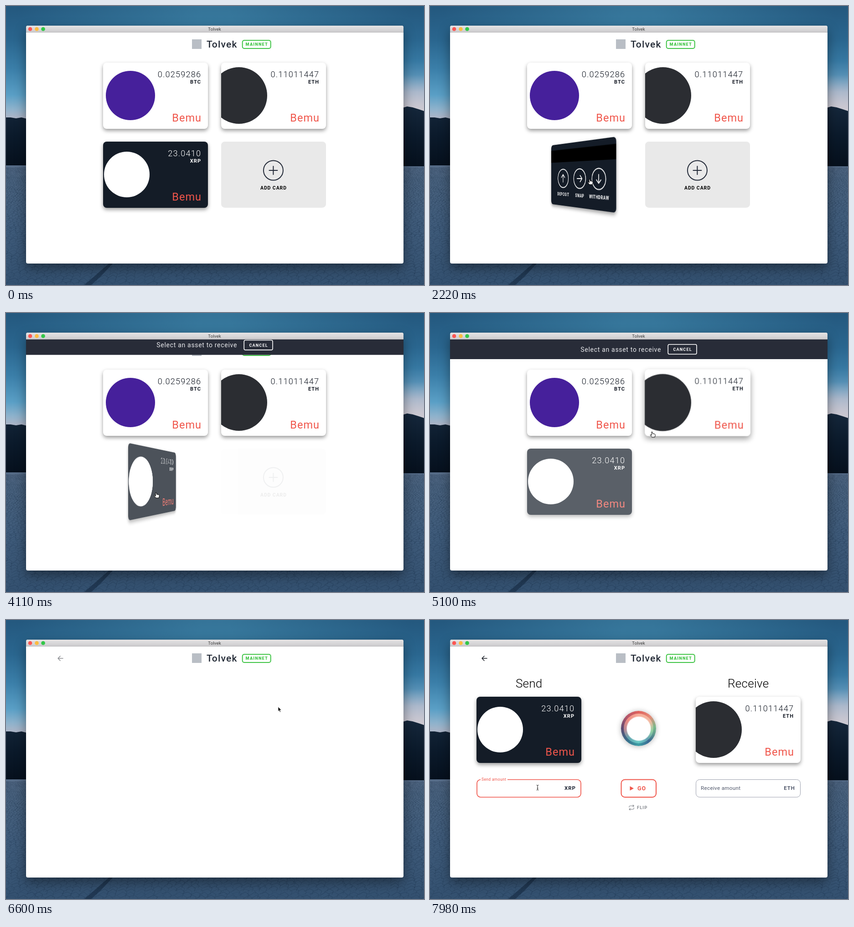
An HTML page with a canvas that plays this animation: 917 by 611 pixels, repeating every 8 s.

```html
<!DOCTYPE html>
<html lang="en">
<head>
<meta charset="utf-8">
<title>Tolvek</title>
<style>
  html, body { margin: 0; width: 100%; height: 100%; overflow: hidden; background: #2b4a68; }
  #stage { position: relative; width: 917px; height: 611px; overflow: hidden; }
  #stage > *, .page, .page > svg, .card, .flipper, .face { position: absolute; left: 0; top: 0; }
  svg { display: block; overflow: visible; font-family: Roboto, Inter, sans-serif; }
  #window { left: 43.5px; top: 42.5px; width: 828px; height: 521.5px; border-radius: 4px; background: #fff;
    box-shadow: 0 10px 26px rgba(0,0,0,.42), 0 0 1px rgba(0,0,0,.4); }
  #titlebar { left: 43.5px; top: 42.5px; width: 828px; height: 15.5px; border-radius: 4px 4px 0 0; box-sizing: border-box;
    background: linear-gradient(#e5e4e5, #cdccce); border-bottom: 1px solid #b4b3b5; }
  #clip { left: 43.5px; top: 58px; width: 828px; height: 60px; overflow: hidden; }
  #bar { position: absolute; width: 828px; height: 43px; background: #282c38; }
  .card { width: 230px; height: 145px; perspective: 700px; }
  .flipper { width: 100%; height: 100%; transform-style: preserve-3d; }
  .face { width: 100%; height: 100%; border-radius: 8px; overflow: hidden; backface-visibility: hidden;
    box-shadow: 0 4px 9px rgba(0,0,0,.4); }
  .face svg { overflow: hidden; }
  .ring { position: absolute; border-radius: 50%; }
</style>
</head>
<body>
<div id="stage"></div>
<script>
const W = 917, H = 611, LOOP = 8000;
const CORAL = '#f0564b', INK = '#141c27', GREEN = '#3fc445';
const APP = 'Tolvek', BRAND = 'Bemu';
const stage = document.getElementById('stage');

// ---- markup helpers ----
const svg = (body, w = W, h = H, id = '') => `<svg id="${id}" width="${w}" height="${h}">${body}</svg>`;
const text = (x, y, str, size, { weight = 400, fill = '#000', anchor = 'start', gap = 0 } = {}) => {
  const shift = anchor === 'end' ? gap : anchor === 'middle' ? gap / 2 : 0;
  return `<text x="${x + shift}" y="${y}" font-size="${size}" font-weight="${weight}" fill="${fill}"
    text-anchor="${anchor}" letter-spacing="${gap}">${str}</text>`;
};
const line = (d, stroke, width) =>
  `<path d="${d}" fill="none" stroke="${stroke}" stroke-width="${width}" stroke-linecap="round" stroke-linejoin="round"/>`;
const box = (x, y, w, h, r, stroke, width) =>
  `<rect x="${x}" y="${y}" width="${w}" height="${h}" rx="${r}" fill="none" stroke="${stroke}" stroke-width="${width}"/>`;
const disc = (x, y, r, fill) => `<circle cx="${x}" cy="${y}" r="${r}" fill="${fill}"/>`;

// ---- cards ----
const ASSETS = {
  BTC: { amount: '0.0259286', bg: '#fff', fg: '#111722', mark: disc(60, 72, 54, '#46209b') },
  ETH: { amount: '0.11011447', bg: '#fff', fg: '#111722', mark: disc(39, 72, 62, '#2b2d32') },
  XRP: { amount: '23.0410', bg: INK, fg: '#fff', mark: disc(52, 72, 50, '#fff') }
};

const action = (x, label, angle) => `<g id="${label}" stroke="#fff" fill="#fff">
  <circle cx="${x}" cy="81" r="21.5" fill="none" stroke-width="2"/>
  <path d="M-9 0H9M2 -7L9 0L2 7" transform="translate(${x} 81) rotate(${angle})" fill="none"
    stroke-width="2" stroke-linecap="round" stroke-linejoin="round"/>
  <text x="${x + .4}" y="122" font-size="10.5" font-weight="600" letter-spacing=".8" stroke="none"
    text-anchor="middle">${label}</text></g>`;

function card(ticker, x, y, id, withBack) {
  const a = ASSETS[ticker];
  const front = a.mark +
    text(214, 31.5, a.amount, 18.2, { weight: 350, fill: a.fg, anchor: 'end', gap: 1.15 }) +
    text(214, 46, ticker, 11, { weight: 600, fill: a.fg, anchor: 'end', gap: 1.1 }) +
    text(215, 128.5, BRAND, 23.5, { fill: CORAL, anchor: 'end', gap: 1 });
  const back = `<rect y="13.5" width="230" height="29.5"/>` +
    action(51.5, 'DEPOSIT', -90) + action(115, 'SWAP', 0) + action(179, 'WITHDRAW', 90);
  return `<div class="card" id="${id}" style="left:${x}px;top:${y}px"><div class="flipper">
    <div class="face" style="background:${a.bg}">${svg(front, 230, 145)}</div>
    ${withBack ? `<div class="face" style="background:${INK};transform:rotateY(180deg)">${svg(back, 230, 145)}</div>` : ''}
  </div></div>`;
}

// ---- pages ----
const header = `<rect x="408" y="73" width="21" height="21" fill="#b9bec5"/>` +
  text(440, 91, APP, 21, { weight: 500, fill: '#232a36', gap: 1.2 }) +
  box(518.7, 75.2, 62, 17.8, 4, GREEN, 2) +
  text(549.7, 87.4, 'MAINNET', 9.2, { weight: 800, fill: GREEN, anchor: 'middle', gap: 1.2 });

const addCard = `<rect x="472" y="297" width="230" height="144.7" rx="8" fill="#e9e9e9"/>
  <circle cx="586.4" cy="360" r="21.5" fill="none" stroke="#232a38" stroke-width="2"/>` +
  line('M577.4 360H595.4M586.4 351V369', '#232a38', 2) +
  text(586.5, 401.7, 'ADD CARD', 10.5, { weight: 600, anchor: 'middle', gap: .9 });

const titlebar = disc(53, 50.5, 4.3, '#fc5753') + disc(67.5, 50.5, 4.3, '#fdbc40') + disc(81.5, 50.5, 4.3, '#33c748') +
  text(457.5, 54, APP, 9.5, { fill: '#3a3a3a', anchor: 'middle', gap: .2 });

const barContent = text(286.3, 26.5, 'Select an asset to receive', 14, { fill: '#e8e9ec', gap: .7 }) +
  box(478.2, 10.8, 62.8, 21.4, 3, '#fff', 1.6) +
  text(509.5, 25, 'CANCEL', 9, { weight: 600, fill: '#fff', anchor: 'middle', gap: 1.2 });

const swapForm = text(217, 148, 'Send', 26, { weight: 300, anchor: 'middle', gap: .2 }) +
  text(698, 148, 'Receive', 26, { weight: 300, anchor: 'middle', gap: .3 }) +
  box(103, 349.5, 228, 38.5, 8, CORAL, 1.7) +
  `<rect x="111" y="346" width="59" height="6" fill="#fff"/>` +
  text(113, 351.8, 'Send amount', 8.5, { fill: CORAL, gap: .35 }) +
  text(319, 371.7, 'XRP', 11.5, { weight: 600, fill: '#1d2433', anchor: 'end', gap: 1 }) +
  box(419.5, 349.5, 76.5, 38.5, 8, CORAL, 2) +
  `<path d="M438.5 364L447 368.7L438.5 373.5Z" fill="${CORAL}"/>` +
  text(455, 373, 'GO', 12.5, { weight: 700, fill: CORAL, gap: 1 }) +
  line('M437 410V409Q437 407 439 407H447M445 405L447.3 407L445 409M447.3 411V412Q447.3 414.5 445 414.5H437M439.3 412.5L437 414.5L439.3 416.5', '#86898f', 1.1) +
  text(454, 414.2, 'FLIP', 9.5, { weight: 600, fill: '#86898f', gap: 1 }) +
  box(583.5, 349.5, 229, 38.5, 8, '#9ca0ae', 1) +
  text(594, 371.7, 'Receive amount', 11.7, { fill: '#50576a', gap: .3 }) +
  text(800, 371.7, 'ETH', 11.5, { weight: 600, fill: '#50576a', anchor: 'end', gap: 1 });

const ringPart = (r, style) =>
  `<div class="ring" style="left:${457.5 - r}px;top:${237.5 - r}px;width:${2 * r}px;height:${2 * r}px;${style}"></div>`;
const ring =
  ringPart(38.5, `box-shadow:0 1px 12px rgba(0,0,0,.3);background:conic-gradient(#e0625d,#e58b78 45deg,#79b98b 85deg,
    #5f9a8c 110deg,#3a6591 140deg,#3f9fa6 180deg,#37708c 220deg,#5b4a72 270deg,#b4566a 315deg,#e0625d)`) +
  ringPart(32.5, `background:conic-gradient(#f6ad9a,#f3b79f 60deg,#8fd09f 100deg,#5f9fb0 140deg,#68c9c5 180deg,
    #5fa3ad 225deg,#b98a96 265deg,#f08b80 310deg,#f6ad9a)`) +
  ringPart(26, 'background:#fff;box-shadow:0 0 3px #fff');

const cursors = `<g id="hand"><path d="M-1 0.8Q0 -.6 1 .8L1.6 4.2L4.2 4.5L6.6 5.4Q7.6 6 7.2 8.4L6.2 12H-.2L-3.6 7.6Q-3.8 6.1 -2.3 6.6L-.6 8Z"
    fill="#fff" stroke="#000" stroke-width="1" stroke-linejoin="round"/></g>
  <g id="arrow"><path d="M0 0V10.2L2.3 8.1L3.9 11.9L5.6 11.2L4 7.5H7.2Z" fill="#000" stroke="#fff" stroke-width=".8"/></g>
  <g id="beam">${line('M-2 -5.5Q0 -5.5 0 -4Q0 -5.5 2 -5.5M0 -4V4M-2 5.5Q0 5.5 0 4Q0 5.5 2 5.5M-1 1.5H1', '#222', 1)}</g>`;

stage.innerHTML = `<canvas id="scene" width="${W}" height="${H}"></canvas><div id="window"></div>
  ${svg(header)}
  <div class="page" id="home">${svg(addCard, W, H, 'add')}
    ${card('BTC', 213.3, 124, 'btc')}${card('ETH', 472, 124, 'eth')}${card('XRP', 213.3, 297, 'xrp', true)}</div>
  <div class="page" id="swap">${svg(swapForm)}${card('XRP', 102, 168.3, 'send')}${card('ETH', 583, 168.3, 'receive')}${ring}</div>
  ${svg(line('M125 84H114.5M119 79L114 84L119 89', '#1d2129', 1.5), W, H, 'back')}
  <div id="clip"><div id="bar">${svg(barContent, 828, 43)}</div></div>
  <div id="titlebar"></div>${svg(titlebar)}${svg(cursors, W, H, 'pointer')}`;

// ---- desert backdrop ----
function paintScene() {
  const c = document.getElementById('scene').getContext('2d');
  let seed = 7;
  const rnd = () => (seed = seed * 16807 % 2147483647) / 2147483647;
  const shade = (gradient, stops) => {
    stops.forEach(([at, color]) => gradient.addColorStop(at, color));
    c.fillStyle = gradient;
  };
  const polygon = points => {
    c.beginPath();
    points.forEach(p => c.lineTo(...p));
    c.fill();
  };

  shade(c.createLinearGradient(0, 0, 0, 250),
    [[0, '#24587e'], [.3, '#2a668f'], [.55, '#3b7fa9'], [.78, '#5a9fc6'], [.9, '#8db2cc'], [1, '#b5b6c6']]);
  c.fillRect(0, 0, W, 350);
  shade(c.createRadialGradient(W / 2, 40, 40, W / 2, 40, 430), [[0, 'rgba(74,150,184,.45)'], [1, 'rgba(74,150,184,0)']]);
  c.fillRect(0, 0, W, 350);
  shade(c.createLinearGradient(0, 120, 0, 225),
    [[0, 'rgba(196,192,206,0)'], [.3, 'rgba(196,192,206,.15)'], [.65, 'rgba(200,194,206,.75)'], [1, '#cbc8d1']]);
  c.fillRect(871, 120, 46, 120);

  shade(c.createLinearGradient(0, 220, 0, 350), [[0, '#15273b'], [.5, '#0b1a2b'], [1, '#06101d']]);
  polygon([[0, 244], [10, 244], [22, 246], [34, 244], [50, 248], [860, 226], [880, 220], [892, 222], [905, 226],
    [917, 230], [917, 351], [0, 349]]);

  shade(c.createLinearGradient(0, 349, 0, H), [[0, '#566c88'], [.12, '#4a637f'], [.5, '#3f5b7a'], [1, '#33506f']]);
  polygon([[0, 349], [W, 351], [W, H], [0, H]]);
  c.lineWidth = .8;
  for (let y = 354; y < H; y += 1.5 + (y - 350) * .022) {
    const size = 3 + (y - 350) * .07;
    for (let x = -rnd() * size; x < W; x += size * (.7 + rnd() * .6)) {
      c.strokeStyle = `rgba(16,36,60,${.12 + rnd() * .28})`;
      c.beginPath();
      c.moveTo(x, y + rnd() * size * .25);
      c.lineTo(x + size * .6, y - size * .15);
      c.lineTo(x + size, y + size * .2 * rnd());
      c.lineTo(x + size * .85, y + size * .45);
      c.stroke();
    }
  }
  c.fillStyle = 'rgba(14,32,54,.5)';
  polygon([[172, H], [196, 590], [228, 562], [236, 562], [208, 592], [187, H]]);
}
paintScene();

// ---- timeline ----
const SWAP_CLICK = 3900, ETH_CLICK = 6250;
const clamp = v => Math.max(0, Math.min(1, v));
const ease = u => u * u * (3 - 2 * u);
const easeOut = u => 1 - (1 - u) ** 2.4;
const ramp = (t, start, length, curve = ease) => curve(clamp((t - start) / length));

// [time, x, y] of the pointer's hot spot
const PATH = [[900, 404, 618], [1650, 356, 396], [2000, 350, 379], [2450, 350, 379], [3150, 329, 393], [4150, 329, 393],
  [5150, 488, 259], [5800, 597, 190], [6750, 597, 190], [6980, 594, 190], [7200, 594, 190], [7800, 236, 367]];

function pointerAt(t) {
  const next = PATH.findIndex(p => p[0] > t);
  if (next === 0) return [PATH[0][1], 640];
  if (next < 0) return PATH.at(-1).slice(1);
  const [t0, x0, y0] = PATH[next - 1], [t1, x1, y1] = PATH[next];
  const u = ease((t - t0) / (t1 - t0));
  return [x0 + (x1 - x0) * u, y0 + (y1 - y0) * u];
}

const el = id => document.getElementById(id);
const inside = (x, y, left, top, w = 230, h = 145) => x >= left && x <= left + w && y >= top && y <= top + h;

function render(t) {
  const [x, y] = pointerAt(t);
  const selecting = t >= SWAP_CLICK;
  const leave = ramp(t, ETH_CLICK, 280);

  // XRP card turns over on click, then back once the swap begins
  const angle = 180 * (ramp(t, 1980, 600, easeOut) - ramp(t, SWAP_CLICK, 600, easeOut));
  el('xrp').firstElementChild.style.transform = `rotateY(${angle}deg)`;
  el('xrp').style.opacity = 1 - .3 * ramp(t, SWAP_CLICK, 300);
  el('add').style.opacity = 1 - ramp(t, SWAP_CLICK, 250);

  const lift = ramp(t, 4960, 120);
  el('eth').style.transform = `scale(${1 + .008 * lift})`;
  el('eth').querySelector('.face').style.boxShadow = `0 ${4 + 2 * lift}px ${9 + 5 * lift}px rgba(0,0,0,.4)`;

  const hot = !selecting && t > 2600 && Math.hypot(x - 328, y - 378) < 20;
  el('SWAP').setAttribute('stroke', hot ? CORAL : '#fff');
  el('SWAP').setAttribute('fill', hot ? CORAL : '#fff');

  el('bar').style.transform = `translateY(${-44 * (1 - ramp(t, SWAP_CLICK, 300) + leave)}px)`;
  el('home').style.opacity = 1 - leave;
  el('home').style.visibility = leave < 1 ? 'visible' : 'hidden';
  el('back').style.opacity = ramp(t, 6500, 200);
  el('swap').style.opacity = ramp(t, 6620, 260);

  const overCard = t < ETH_CLICK + 200 && (selecting ? inside(x, y, 472, 124) || t < 4150 : inside(x, y, 213, 297));
  const kind = overCard ? 'hand' : t > 7000 && inside(x, y, 102, 349, 230, 39) ? 'beam' : 'arrow';
  for (const name of ['hand', 'arrow', 'beam']) {
    el(name).setAttribute('display', name === kind ? 'inline' : 'none');
    el(name).setAttribute('transform', `translate(${x} ${y})`);
  }
}

const start = performance.now();
function tick() {
  render((performance.now() - start) % LOOP);
  requestAnimationFrame(tick);
}
tick();
</script>
</body>
</html>
```
